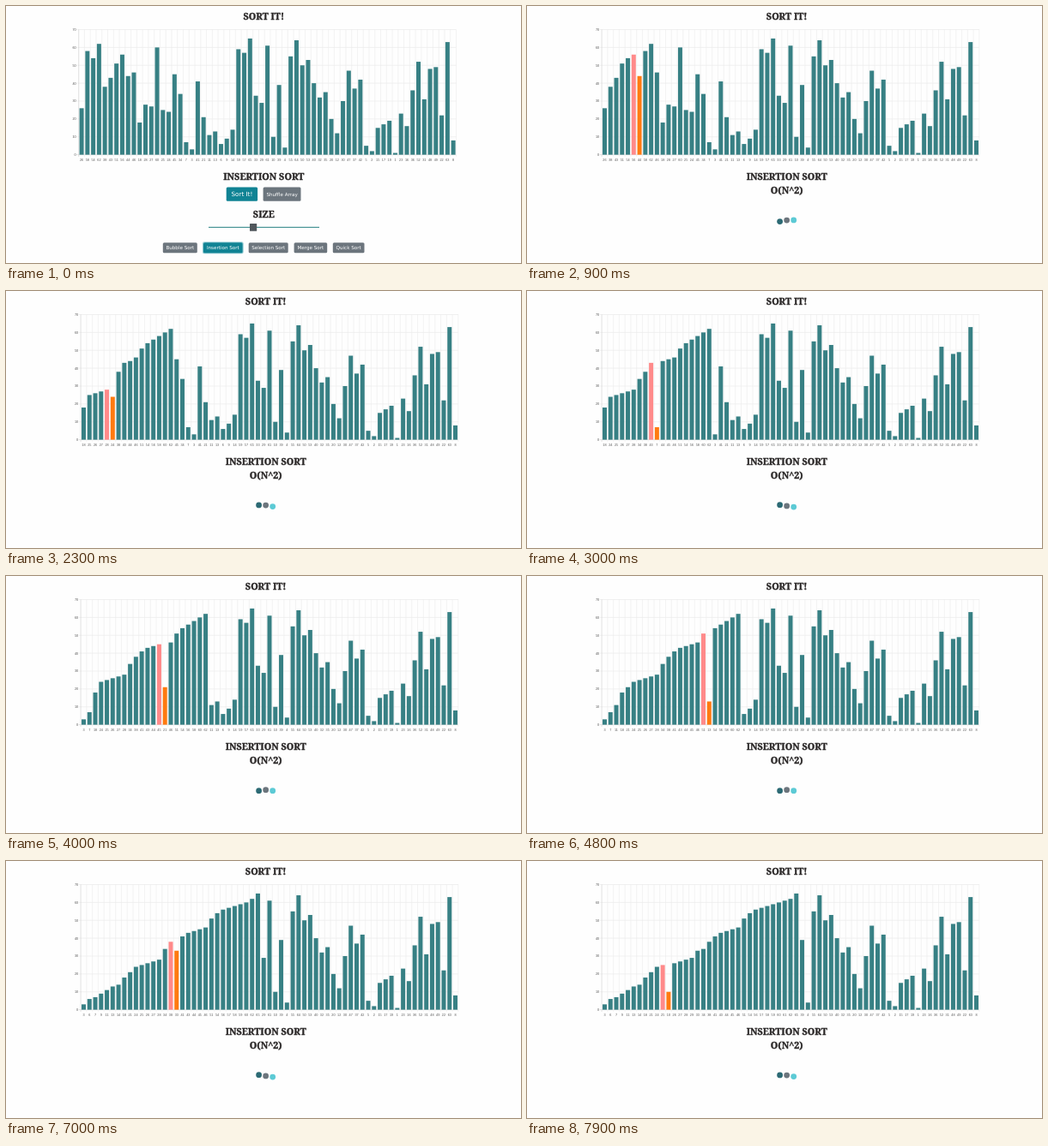
Recreate the animation shown at these times as an HTML page with a canvas. Size 600x300 px, loop 8000 ms.

```html
<!DOCTYPE html>
<html lang="en">
<head>
<meta charset="utf-8">
<title>Sort It!</title>
<style>
  html, body { margin: 0; width: 100%; height: 100%; overflow: hidden; background: #fefefe; }
  canvas { display: block; width: 600px; height: 300px; }
</style>
</head>
<body>
<canvas id="stage"></canvas>
<script>
const LOOP = 8000, START = 500, TICK = 100;
const TEAL = '#378084', PINK = '#ff8a8a', ORANGE = '#ff7a10', GRAY = '#6c757d', INFO = '#108394';
const VALUES = [
  26, 58, 54, 62, 38, 43, 51, 56, 44, 46, 18, 28, 27, 60, 25, 24, 45, 34, 7, 3, 41, 21,
  11, 13, 6, 9, 14, 59, 57, 65, 33, 29, 61, 10, 39, 4, 55, 64, 50, 53, 40, 32, 35, 20,
  12, 30, 47, 37, 42, 5, 2, 15, 17, 19, 1, 23, 16, 36, 52, 31, 48, 49, 22, 63, 8];
// [time in ms, number of comparisons made so far]
const PACE = [[500, 0], [1300, 41], [1600, 54], [3000, 122], [4000, 168], [5600, 243],
  [6100, 267], [7000, 313], [7600, 343], [7900, 359]];
const CHART = { left: 84.7, base: 173.6, top: 27.5, width: 439.8, max: 70 };

const canvas = document.getElementById('stage');
const ctx = canvas.getContext('2d');
const ratio = window.devicePixelRatio || 1;
canvas.width = 600 * ratio;
canvas.height = 300 * ratio;

// Every comparison of the insertion sort is one step.
function insertionSteps(values) {
  const list = values.slice(), steps = [];
  for (let i = 1; i < list.length; i++) {
    for (let j = i; j > 0; j--) {
      steps.push({ list: list.slice(), active: j });
      if (list[j - 1] <= list[j]) break;
      [list[j - 1], list[j]] = [list[j], list[j - 1]];
    }
  }
  return steps;
}
const steps = insertionSteps(VALUES);

function stepAt(time) {
  const k = Math.max(1, PACE.findIndex(([t]) => t >= time));
  const [t0, n0] = PACE[k - 1], [t1, n1] = PACE[k];
  return steps[Math.round(n0 + (n1 - n0) * (time - t0) / (t1 - t0))];
}

function text(str, x, y, font, color, align = 'center') {
  ctx.font = font;
  ctx.fillStyle = color;
  ctx.textAlign = align;
  ctx.textBaseline = 'alphabetic';
  ctx.fillText(str, x, y);
}

function heading(str, x, baseline) {
  text(str, x, baseline, '900 10.8px "Noto Serif", serif', '#2b2828');
  ctx.strokeStyle = '#2b2828';
  ctx.lineWidth = 0.4;
  ctx.lineJoin = 'round';
  ctx.strokeText(str, x, baseline);
}

function line(x0, y0, x1, y1, color, width) {
  ctx.strokeStyle = color;
  ctx.lineWidth = width;
  ctx.beginPath();
  ctx.moveTo(x0, y0);
  ctx.lineTo(x1, y1);
  ctx.stroke();
}

function box(x, y, w, h, radius, color) {
  ctx.fillStyle = color;
  ctx.beginPath();
  ctx.roundRect(x, y, w, h, radius);
  ctx.fill();
}

function button(label, x, y, w, h, color, size = 5.6) {
  box(x, y, w, h, 1.5, color);
  text(label, x + w / 2, y + h / 2 + size * 0.36, `${size}px "DejaVu Sans", sans-serif`, '#fff');
}

function drawChart(list, active, shift) {
  const { base, top, width, max } = CHART;
  const left = CHART.left + shift;
  const slot = width / list.length, unit = (base - top) / max;
  const font = '3.8px "Liberation Sans", Arial, sans-serif';

  for (let v = 0; v <= max; v += 10) {
    const y = base - v * unit;
    line(left - 2.5, y, left + width, y, v ? '#e7e7e7' : '#cfcfcf', 0.6);
    text(v, left - 3, y + 1.4, font, '#555', 'right');
  }
  for (let i = 0; i <= list.length; i++) {
    const x = left + i * slot;
    line(x, top, x, base + 2.5, i ? '#ebebeb' : '#cfcfcf', 0.6);
  }
  list.forEach((value, i) => {
    const x = left + (i + 0.5) * slot;
    ctx.fillStyle = i === active ? ORANGE : i === active - 1 ? PINK : TEAL;
    ctx.fillRect(x - slot * 0.37, base - value * unit, slot * 0.74, value * unit);
    text(value, x, 181, font, '#555');
  });
}

function drawControls() {
  button('Sort It!', 256.7, 211.5, 36.4, 16.2, INFO, 7.2);
  button('Shuffle Array', 299.6, 211.5, 43.9, 16.2, GRAY);
  heading('SIZE', 300.3, 247.3);
  line(236, 258.4, 365, 258.4, '#4b9697', 1.3);
  box(284, 254, 8.2, 8.8, 0.5, '#50575c');

  box(228.9, 275.2, 47.8, 14.1, 2.2, '#94cbd3');
  const choices = [['Bubble', 182.8, 40], ['Insertion', 230, 45.6], ['Selection', 282.7, 46],
    ['Merge', 335.6, 38.6], ['Quick', 380.8, 36.7]];
  for (const [name, x, w] of choices)
    button(name + ' Sort', x, 276.2, w, 12.1, name === 'Insertion' ? INFO : GRAY);
}

function drawLoader(time) {
  ['#2c6a74', '#6c757d', '#5ccad5'].forEach((color, i) => {
    const phase = (time - 1600 - 620 - i * 180) / 800 * 2 * Math.PI;
    ctx.fillStyle = color;
    ctx.beginPath();
    ctx.arc(294.6 + i * 8.05, 250.9 - 1.2 * Math.cos(phase), 3.4, 0, 2 * Math.PI);
    ctx.fill();
  });
}

function draw(now) {
  const time = Math.floor((now % LOOP) / TICK) * TICK;
  const running = time >= START;
  const shift = running ? 2.4 : 0;
  const { list, active } = running ? stepAt(time) : { list: VALUES, active: -1 };

  ctx.setTransform(ratio, 0, 0, ratio, 0, 0);
  ctx.fillStyle = '#fefefe';
  ctx.fillRect(0, 0, 600, 300);
  heading('SORT IT!', 300.2 + shift, 15.6);
  drawChart(list, active, shift);
  heading('INSERTION SORT', 300.3 + shift, 203.3);
  if (running) {
    heading('O(N^2)', 300.3 + shift, 219.2);
    drawLoader(time);
  } else {
    drawControls();
  }
  requestAnimationFrame(() => draw(performance.now() - origin));
}
const origin = performance.now();
draw(0);
</script>
</body>
</html>
```
